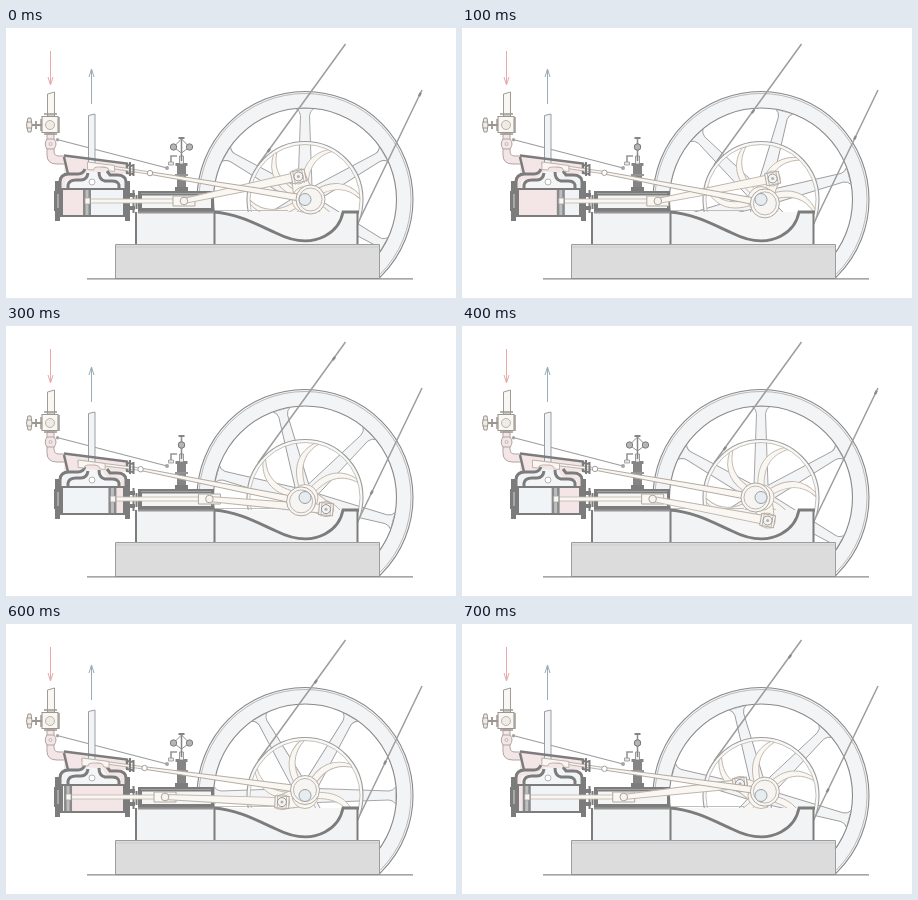
Animation, 450 px wide and 270 px high, one loop 800 ms. Source, as an HTML page with a canvas:

```html
<!DOCTYPE html>
<html lang="en">
<head>
<meta charset="utf-8">
<title>Steam engine</title>
<style>
html, body { margin: 0; width: 100%; height: 100%; overflow: hidden; background: #fff; }
canvas { display: block; width: 450px; height: 270px; }
</style>
</head>
<body>
<canvas id="stage" width="450" height="270"></canvas>
<script>
const g = document.getElementById('stage').getContext('2d');
const STEP = 100, STEPS = 8, TAU = Math.PI * 2;
const LINE = '#9d9d9d', DARK = '#7c7c7c', IRON = '#f3f4f6', CREAM = '#faf6f1';
const PINK = '#f4e6e7', PALE = '#f1f4f6', TAN = '#beb6ae';
const shaft = { x: 299, y: 171.5 };
const rad = deg => deg * Math.PI / 180;

function draw(d, fill, stroke, width = 1) {
  const p = new Path2D(d);
  if (fill) { g.fillStyle = fill; g.fill(p); }
  if (stroke) { g.strokeStyle = stroke; g.lineWidth = width; g.stroke(p); }
}
function rect(x, y, w, h, fill, stroke, width) {
  draw(`M${x} ${y}h${w}v${h}h${-w}z`, fill, stroke, width);
}
function disc(x, y, r, fill, stroke, width = 1) {
  g.beginPath();
  g.arc(x, y, r, 0, TAU);
  if (fill) { g.fillStyle = fill; g.fill(); }
  if (stroke) { g.strokeStyle = stroke; g.lineWidth = width; g.stroke(); }
}
function at(x, y, angle, paint) {
  g.save();
  g.translate(x, y);
  g.rotate(angle);
  paint();
  g.restore();
}
// Tapered bar between two points
function bar(a, b, wa, wb, fill, stroke, width) {
  const len = Math.hypot(b.x - a.x, b.y - a.y);
  at(a.x, a.y, Math.atan2(b.y - a.y, b.x - a.x), () =>
    draw(`M0 ${-wa / 2}L${len} ${-wb / 2}V${wb / 2}L0 ${wa / 2}z`, fill, stroke, width));
}
function ring(r, inner, fill) {
  g.beginPath();
  g.arc(shaft.x, shaft.y, r, 0, TAU);
  g.arc(shaft.x, shaft.y, inner, 0, TAU, true);
  g.fillStyle = fill;
  g.fill();
}
function polar(deg, r) {
  return { x: shaft.x + r * Math.sin(rad(deg)), y: shaft.y - r * Math.cos(rad(deg)) };
}

// The wheel sinks into a slot below the ground line
function flywheel(turn) {
  g.save();
  g.beginPath();
  g.rect(0, 0, 450, 250.5);
  g.clip();
  for (let i = 0; i < 6; i++) {
    at(shaft.x, shaft.y, rad(turn + i * 60), () =>
      draw('M-7 -12L-4.5 -84Q-5 -89 -9 -91H9Q5 -89 4.5 -84L7 -12', IRON, LINE, .9));
  }
  ring(108, 91, IRON);
  disc(shaft.x, shaft.y, 108, null, '#8a8a8a', 1.1);
  disc(shaft.x, shaft.y, 106, null, '#ababab', .8);
  disc(shaft.x, shaft.y, 91.5, null, '#8a8a8a', 1.1);
  g.restore();
}

function pulley(turn) {
  for (let i = 0; i < 6; i++) {
    at(shaft.x, shaft.y, rad(turn + i * 60), () =>
      draw('M-3 -12C-4 -32 5 -46 24 -50L27 -48C11 -43 3 -32 3 -12', CREAM, TAN, .9));
  }
  ring(58, 55, '#f8f8f6');
  disc(shaft.x, shaft.y, 58, null, LINE, 1.1);
  disc(shaft.x, shaft.y, 55, null, '#b8b1aa', .8);
}

// Marks ride along both runs of the belt
function belt(k) {
  const s = [5, 53, 85, 116][k % 4];
  draw('M339.5 16L252 137M416 62L351 197', null, LINE, 1.5);
  const mark = (x, y, dx, dy) =>
    draw(`M${x - dx * 2} ${y - dy * 2}l${dx * 4} ${dy * 4}`, null, '#8a8a8a', 2.4);
  mark(416 - .434 * s, 62 + .901 * s, .434, -.901);
  const u = s - 53;
  mark(291 + .586 * u, 83.5 - .81 * u, .586, -.81);
}

function bed() {
  const pit = '184C232 186 250 196 270 205C286 213 304 216 319 208Q334 200 337 184';
  rect(130, 184, 222, 32, '#f2f3f4');
  draw('M208 ' + pit + 'z', '#f6f6f6');
  draw('M130 184V216M208.5 184V216M351.5 184V216', null, DARK, 2);
  draw('M208 ' + pit + 'H353', null, DARK, 2.8);
  draw('M209 182.5H282', null, '#b0b0b0', .8);
  rect(109.5, 216.5, 264, 34, '#dcdcdc', LINE, 1);
  draw('M110 219H373', null, '#c2c2c2', .7);
  draw('M81 250.8H407', null, '#8a8a8a', 1.2);
}

function guide() {
  rect(132, 163, 76, 22, DARK);
  rect(136, 167.5, 69, 12.5, '#f5f5f5');
  rect(135, 165, 70, 1, '#a0a0a0');
  rect(132, 183.5, 76, 2, '#959595');
}

function governor(turn) {
  rect(171, 136, 9, 27, '#858585');
  rect(169, 159, 13, 4, DARK);
  rect(169, 146, 13, 2, '#959595');
  rect(169.5, 135, 12, 3, '#858585');
  rect(173.5, 128, 4, 8, '#eee', '#858585', .8);
  draw('M175.5 109V133', null, '#858585', 1.5);
  const reach = 8 * Math.cos(rad(turn));
  for (const side of [-1, 1]) {
    const x = 175.5 + side * reach;
    draw(`M175.5 111L${x} 119L175.5 125`, null, '#909090', 1);
    disc(x, 119, 3.2, '#b5b5b5', '#7c7c7c', 1);
  }
  rect(172.5, 109, 6, 2, '#858585');
  draw('M171 128H165V136', null, '#959595', 1.6);
  rect(162.5, 134, 5, 3, '#e5e5e5', '#959595', .8);
  draw('M51 111.5L161 140', null, LINE, 1.2);
  disc(51.5, 111.7, 1.7, '#a5a5a5');
  disc(161, 140, 2, '#a5a5a5');
}

function arrows() {
  draw('M44.5 23V56M42 49L44.5 57L47 49', null, '#e8aaaa', 1);
  draw('M85.5 76V42M83 49L85.5 41L88 49', null, '#9aacb7', 1);
}

function pipes() {
  draw('M41.5 66L48.5 64V88H41.5z', CREAM, LINE, 1);
  draw('M41 106V127Q41 136 51 136H60V128H53Q48 128 48 123V106z', PINK, '#b3a2a2', 1);
  draw('M41 111Q37.5 116 41 121H48Q52 116 48 111z', PINK, '#b3a2a2', 1);
  disc(44.5, 116, 1.5, '#eee', '#aaa', .7);
  rect(36, 88.5, 16, 16, CREAM, '#9b9690', 1.1);
  draw('M35 91V103M53 89V105M38 86H51M38 106H51', null, '#9b9690', 1.4);
  disc(44, 97, 4.5, '#f0ebe5', '#aaa39c', .8);
  draw('M25 97H36M30 93V101', null, '#9b9690', 1.8);
  draw('M22 90Q19 97 22 104H25Q27 97 25 90z', '#f0ebe5', '#9b9690', 1);
  draw('M20.5 94H26M20.5 100H26', null, '#9b9690', .9);
}

function cylinder(piston, steamLeft) {
  const left = steamLeft ? PINK : PALE, right = steamLeft ? PALE : PINK;
  draw('M59 127L121 135V145L110 148H65L58 145z', PINK);
  draw('M82.5 87.5L89 86V138H82.5z', PALE, LINE, 1);
  draw('M53 160V153Q54 146 63 146L78 143L102 145L112 148Q121 148 121 160z', '#f4f5f6');
  draw('M57 160V155Q57 149 65 149H74L80 142', null, left, 4);
  draw('M117 160V155Q117 151 110 151H103L98 144', null, right, 4);
  rect(54, 160, 66, 29, DARK);
  rect(57, 162, piston - 57, 25, left);
  rect(piston, 162, 117 - piston, 25, right);
  draw('M54 162V154Q54 146 63 146H72Q77 146 79 141M120 162V154Q120 147 111 147H104L101 143', null, DARK, 3);
  draw('M62 161V157Q63 152 70 152H75Q81 152 82 145M113 161V157Q112 153 106 153H99Q93 152 93 144', null, DARK, 3);
  disc(86, 154, 3, '#fff', '#a5a5a5', .8);
  draw('M58 127.5L121 135.5V145M58 129L62 146', null, DARK, 2.5);
  rect(49, 153, 5, 40, DARK);
  rect(119, 153, 5, 40, DARK);
  rect(48, 163, 8, 20, DARK);
  rect(51, 166, 2, 14, '#a8a8a8');
  rect(118, 165, 11, 4, DARK);
  rect(118, 178, 11, 4, DARK);
  draw('M127.5 162V185M130.5 167V181', null, DARK, 2);
}

function valve(pin) {
  const x = pin.x - 138.5;
  bar({ x: 76 + x, y: 135.5 }, pin, 2.4, 2.4, CREAM, '#b0a8a0', .8);
  draw(`M${76 + x} 134l27 3.5v6l-5 -.5q-1 -4 -5 -4h-7q-4 0 -4 3l-6 -.5z`, CREAM, TAN, 1);
  draw('M121 137L128 138M120 145L127 146M124 134V148M127.5 136V148', null, DARK, 2);
}

function mechanism(k) {
  const deg = k * 45;
  const crank = polar(deg - 16, 24);
  const cross = { x: crank.x - Math.sqrt(117 ** 2 - (173 - crank.y) ** 2), y: 173 };
  const piston = cross.x - 97;
  const ecc = polar(deg + 90, 5.5);
  const pin = { x: ecc.x - 160.5, y: 144 + (ecc.x - shaft.x) * .2 };

  cylinder(piston, (k + 1) % 8 < 4);
  rect(piston, 171, cross.x - piston, 4, CREAM, TAN, .8);
  rect(piston - 4, 162, 8, 25, '#8a8a8a');
  rect(piston - 1.5, 162, 3, 25, '#bcbec0');
  rect(piston - 2, 170, 5, 6, CREAM, '#a5a5a5', .8);

  bar(shaft, crank, 22, 14, CREAM, TAN, 1);
  disc(crank.x, crank.y, 7.5, CREAM, TAN, 1);
  disc(shaft.x, shaft.y, 13, CREAM, TAN, 1);
  rect(cross.x - 11, 168, 22, 10, CREAM, '#b0a8a0', 1);
  bar(cross, crank, 5, 9, CREAM, TAN, 1);
  at(crank.x, crank.y, Math.atan2(crank.y - cross.y, crank.x - cross.x), () => {
    rect(-7, -6, 14, 12, CREAM, '#b0a8a0', 1);
    draw('M-4.5 -7.5V7.5M4.5 -7.5V7.5', null, TAN, 1);
  });
  disc(crank.x, crank.y, 4.5, '#f3f3f3', '#959595', 1);
  disc(crank.x, crank.y, 1.5, '#b0b0b0');
  disc(cross.x, cross.y, 3.8, '#f8f3ed', '#a5a5a5', 1);

  valve(pin);
  bar(pin, ecc, 2.5, 7, CREAM, '#b0a8a0', .9);
  disc(pin.x, pin.y, 2.7, '#fff', '#a0a0a0', 1);
  disc(ecc.x, ecc.y, 14.5, CREAM, '#b0a8a0', 1);
  disc(ecc.x, ecc.y, 11.5, '#f7f5f2', '#b0b0b0', .9);
  disc(shaft.x, shaft.y, 6, '#e7ecf1', '#9aa0a5', 1);
}

function render(k) {
  g.fillStyle = '#fff';
  g.fillRect(0, 0, 450, 270);
  const turn = k * 15;
  flywheel(turn);
  belt(k);
  pulley(turn);
  bed();
  guide();
  governor(k * 90);
  arrows();
  pipes();
  mechanism(k);
}

const start = performance.now();
let shown = -1;
function tick() {
  const k = Math.floor((performance.now() - start) / STEP) % STEPS;
  if (k !== shown) render(shown = k);
  requestAnimationFrame(tick);
}
tick();
</script>
</body>
</html>
```
